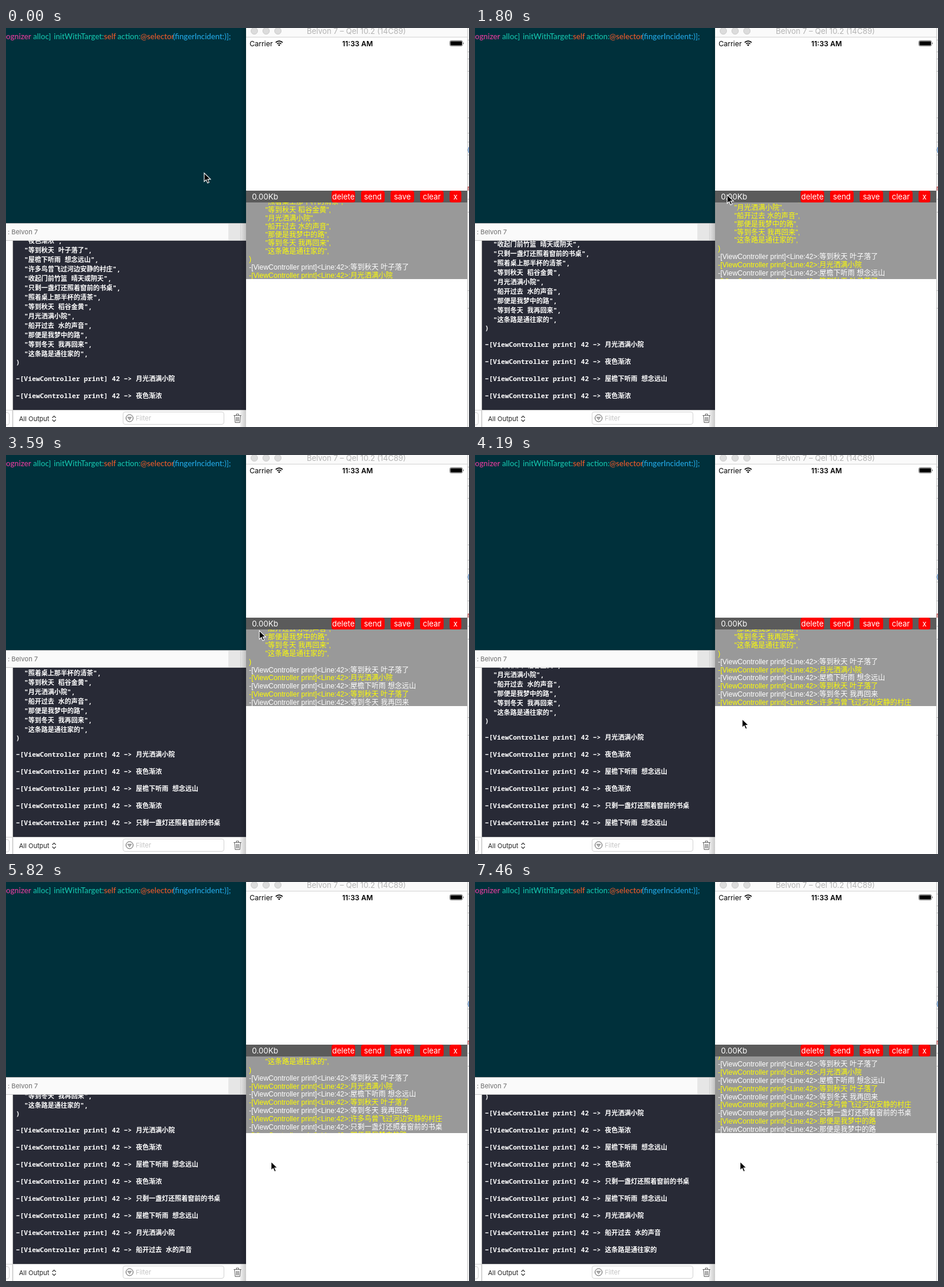
Animation of 785x677 px, one loop 8 s. Source, as an HTML page:

```html
<!DOCTYPE html>
<html lang="zh-CN">
<head>
<meta charset="utf-8">
<title>Console log overlay</title>
<style>
  html, body { margin: 0; width: 100%; height: 100%; overflow: hidden; background: #fff; }
  svg { display: block; width: 785px; height: 677px; }
  text { white-space: pre; }
  .ui { font-family: Inter, 'Open Sans', sans-serif; }
  .code { font: 500 13.2px Lato, sans-serif; }
  .panel { font: 300 12px 'Liberation Sans', 'Noto Sans CJK SC', 'Noto Sans CJK', sans-serif; }
  .console { font: bold 11px 'Noto Sans CJK SC', 'Noto Sans CJK', sans-serif; fill: #fff; word-spacing: 4.3px; }
  .mono { font: 600 11.3px 'Noto Sans Mono', 'DejaVu Sans Mono', monospace; word-spacing: 0; }
</style>
</head>
<body>
<svg id="stage" viewBox="0 0 785 677">
  <defs>
    <linearGradient id="shade">
      <stop offset="0" stop-opacity="0"/>
      <stop offset="1" stop-opacity=".16"/>
    </linearGradient>
    <clipPath id="consoleClip"><rect x="12" y="361" width="395" height="287"/></clipPath>
    <clipPath id="panelClip"><rect x="407" y="296" width="375" height="130"/></clipPath>
  </defs>

  <!-- editor -->
  <rect width="785" height="677" fill="#fff"/>
  <rect width="407" height="332" fill="#00303b"/>
  <g id="code" class="code"></g>

  <!-- debug bar -->
  <rect y="331" width="407" height="30" fill="#fafafa"/>
  <rect x="377" y="332" width="30" height="28" fill="#e6e6e6"/>
  <path d="M0 331.5H407" stroke="#b8b8b8"/>
  <path d="M0 360.5H407" stroke="#c9c9c9"/>
  <path d="M397.5 332V360" stroke="#d4d4d4"/>
  <text class="ui" x="3" y="350" font-size="11" fill="#6c6c6c">: Belvon 7</text>

  <!-- console -->
  <rect x="12" y="361" width="395" height="287" fill="#282a36"/>
  <path d="M11.5 361V677" stroke="#b0b0b0"/>
  <g clip-path="url(#consoleClip)"><g id="console" class="console"></g></g>

  <!-- filter bar -->
  <g fill="none" stroke="#d2d2d2">
    <path d="M0 648.5H407"/>
    <rect x="198.5" y="651.5" width="171" height="21" rx="3.5"/>
    <rect x="-20" y="652.5" width="25.5" height="21" rx="3.5"/>
  </g>
  <rect x="397" y="649" width="10" height="28" fill="#f1f1f1"/>
  <g class="ui" font-size="11">
    <text x="22" y="667" fill="#222">All Output</text>
    <text x="220" y="666" fill="#c3c3c3">Filter</text>
  </g>
  <g fill="none" stroke="#555">
    <path d="M78.5 661.5l3-3.2 3 3.2M78.5 664.5l3 3.2 3-3.2" stroke="#333" stroke-width="1.2"/>
    <circle cx="209.5" cy="662" r="6"/>
    <path d="M206 660.5h7M207 662.5h5M208.5 664.5h2"/>
    <path d="M386 657.5h13M390.5 657v-2h4v2M387.5 658l1 11.5h8l1-11.5M390.5 660v7.5M392.5 660v7.5M394.5 660v7.5" stroke="#666"/>
  </g>
  <rect x="397" width="10" height="677" fill="url(#shade)"/>

  <!-- simulator -->
  <rect x="407" width="375" height="677" fill="#fff"/>
  <rect x="407" width="375" height="15" fill="#fafafa"/>
  <path d="M407 15.5H782" stroke="#d3d3d3"/>
  <g fill="#dcdcdc" stroke="#cbcbcb">
    <circle cx="421" cy="5" r="5.6"/><circle cx="441" cy="5" r="5.6"/><circle cx="461" cy="5" r="5.6"/>
  </g>
  <g class="ui" text-anchor="middle">
    <text x="594" y="10" font-size="13" fill="#b3b3b3">Belvon 7 – Qel 10.2 (14C89)</text>
    <text x="596" y="31" font-size="12" font-weight="600">11:33 AM</text>
    <text x="413" y="31" font-size="12" text-anchor="start">Carrier</text>
  </g>
  <g fill="none" stroke="#000" stroke-width="1.7">
    <path d="M457.3 24.6a8.2 8.2 0 0 1 11.6 0M459.5 27a5.1 5.1 0 0 1 7.2 0"/>
    <path d="M463.1 30.8l-2-2.2a2.9 2.9 0 0 1 4 0z" fill="#000" stroke="none"/>
  </g>
  <rect x="752.5" y="21.5" width="21.5" height="9" rx="2" fill="#fff" stroke="#777"/>
  <rect x="753.5" y="22.5" width="19.5" height="7" rx="1"/>
  <path d="M775 24.3q1.6 1.7 0 3.4z"/>

  <!-- log overlay -->
  <rect x="407" y="296" width="375" height="130" fill="#999"/>
  <g clip-path="url(#panelClip)"><g id="panel" class="panel"></g></g>
  <rect x="407" y="276" width="375" height="20" fill="#5b5b5b"/>
  <g id="buttons" class="ui" font-size="13" fill="#fff"><text x="417" y="290.5">0.00Kb</text></g>

  <!-- window behind -->
  <rect x="782" width="3" height="677" fill="#f5f5f5"/>
  <path d="M782.5 0V677" stroke="#c6c6c6"/>
  <path id="edge" stroke="#bdbdbd"/>
  <path d="M785 202q-3 5 0 10" fill="none" stroke="#2a6fc0"/>
  <path d="M783.5 269v7M783 270h2" stroke="#c03030"/>

  <path id="cursor" d="M0 0V14.6L3.4 11.5 5.8 17 8.3 15.9 6 10.6H10.8Z" fill="#000" stroke="#fff" stroke-width="1.1"/>
</svg>
<script>
const LOOP = 8000, TICK = 149.2;
const $ = id => document.getElementById(id);

const verse = [
  '夜色渐浓', '等到秋天 叶子落了', '屋檐下听雨 想念远山',
  '许多鸟曾飞过河边安静的村庄', '收起门前竹篮 晴天或阴天',
  '只剩一盏灯还照着窗前的书桌', '照着桌上那半杯的清茶',
  '等到秋天 稻谷金黄', '月光洒满小院', '船开过去 水的声音',
  '那便是我梦中的路', '等到冬天 我再回来', '这条路是通往家的'
];
const consoleLog = [8, 0, 2, 0, 5, 2, 8, 9, 12];
const panelLog = [1, 8, 2, 1, 11, 3, 5, 10, 10];

// Tick of each new log line, then how far the overlay has scrolled on that and following ticks
const arrivals = [
  [5, .3, .85], [12, .3, .85], [19, .6], [26, .3, .85],
  [34, .6], [39, .3, .85], [48, .3, .85]
];
// Cursor tip: tick, x, y
const moves = [
  [0, 336, 246], [1, 342, 248], [2, 370, 259], [3, 402, 273], [4, 422, 281], [5, 427.5, 283],
  [24, 429.5, 298], [25, 436, 335], [26, 444, 380], [27, 449, 420], [28, 453, 448],
  [29, 455, 465], [30, 456, 474], [31, 456.5, 477], [33, 455.5, 476], [34, 452, 475], [35, 449.5, 474.5]
];

function add(parent, tag, attrs, text) {
  const el = document.createElementNS('http://www.w3.org/2000/svg', tag);
  for (const k in attrs) el.setAttribute(k, attrs[k]);
  if (text) el.textContent = text;
  return parent.appendChild(el);
}

const TEAL = '#14c0aa', ORANGE = '#ea5a2c';
[[0, 'ognizer', '#e43c9c'], [46, 'alloc]', TEAL], [81, 'initWithTarget:', TEAL],
 [166, 'self', ORANGE], [189, 'action:', TEAL], [228, '@selector', ORANGE],
 [283, '(fingerIncident:)];', '#22a6e2']
].forEach(([x, s, fill]) => add($('code'), 'text', { x, y: 19, fill }, s));

[[552, 40, 'delete'], [602, 40, 'send'], [652, 40, 'save'], [702, 40, 'clear'], [752, 20, 'x']]
.forEach(([x, width, s]) => {
  add($('buttons'), 'rect', { x, y: 276, width, height: 20, rx: 4, fill: '#fe0000' });
  add($('buttons'), 'text', { x: x + width / 2, y: 290.5, 'text-anchor': 'middle' }, s);
});

$('edge').setAttribute('d', [20, 40, 52, 73, 152, 178, 193, 215, 247, 290, 312, 445, 475]
  .map(y => `M782 ${y}.5h3`).join(''));

// Both lists are laid out around the closing bracket at y = 0
function consoleRow(x, y, before, text, after) {
  const row = add($('console'), 'text', { x, y });
  add(row, 'tspan', { class: 'mono' }, before);
  add(row, 'tspan', {}, text);
  add(row, 'tspan', { class: 'mono' }, after);
  return row;
}
const ROW = 13.87, YELLOW = '#ff0';
const panelRow = (x, row, fill, s) => add($('panel'), 'text', { x, y: row * ROW, fill }, s);

verse.forEach((s, i) => {
  consoleRow(31, -14 - 16 * (12 - i), '"', s, '",');
  if (i > 5) panelRow(439.7, i - 13, YELLOW, `"${s}",`);
});
consoleRow(16.8, 0, ')', '', '');
panelRow(412, 0, YELLOW, ')');

const rows = consoleLog.map((v, i) => [
  consoleRow(16.8, 28 + 29 * i, '−[ViewController print] 42 −> ', verse[v], ''),
  panelRow(412, i + 1, i % 2 ? YELLOW : '#fff', `-[ViewController print]<Line:42>:${verse[panelLog[i]]}`)
]);

function draw(t) {
  const tick = Math.floor(t / TICK + .001);
  let count = 2, scroll = 2;
  for (const [at, ...part] of arrivals) {
    if (tick < at) break;
    scroll = count + (part[tick - at] ?? 1);
    count++;
  }
  rows.forEach((pair, i) => pair.forEach(el => el.style.display = i < count ? '' : 'none'));
  $('console').setAttribute('transform', `translate(0 ${629 - 29 * count})`);
  $('panel').setAttribute('transform', `translate(0 ${424.1 - ROW * scroll})`);
  const [, x, y] = moves.filter(m => m[0] <= tick).pop();
  $('cursor').setAttribute('transform', `translate(${x} ${y})`);
}

function frame() {
  draw(performance.now() % LOOP);
  requestAnimationFrame(frame);
}
frame();
</script>
</body>
</html>
```
